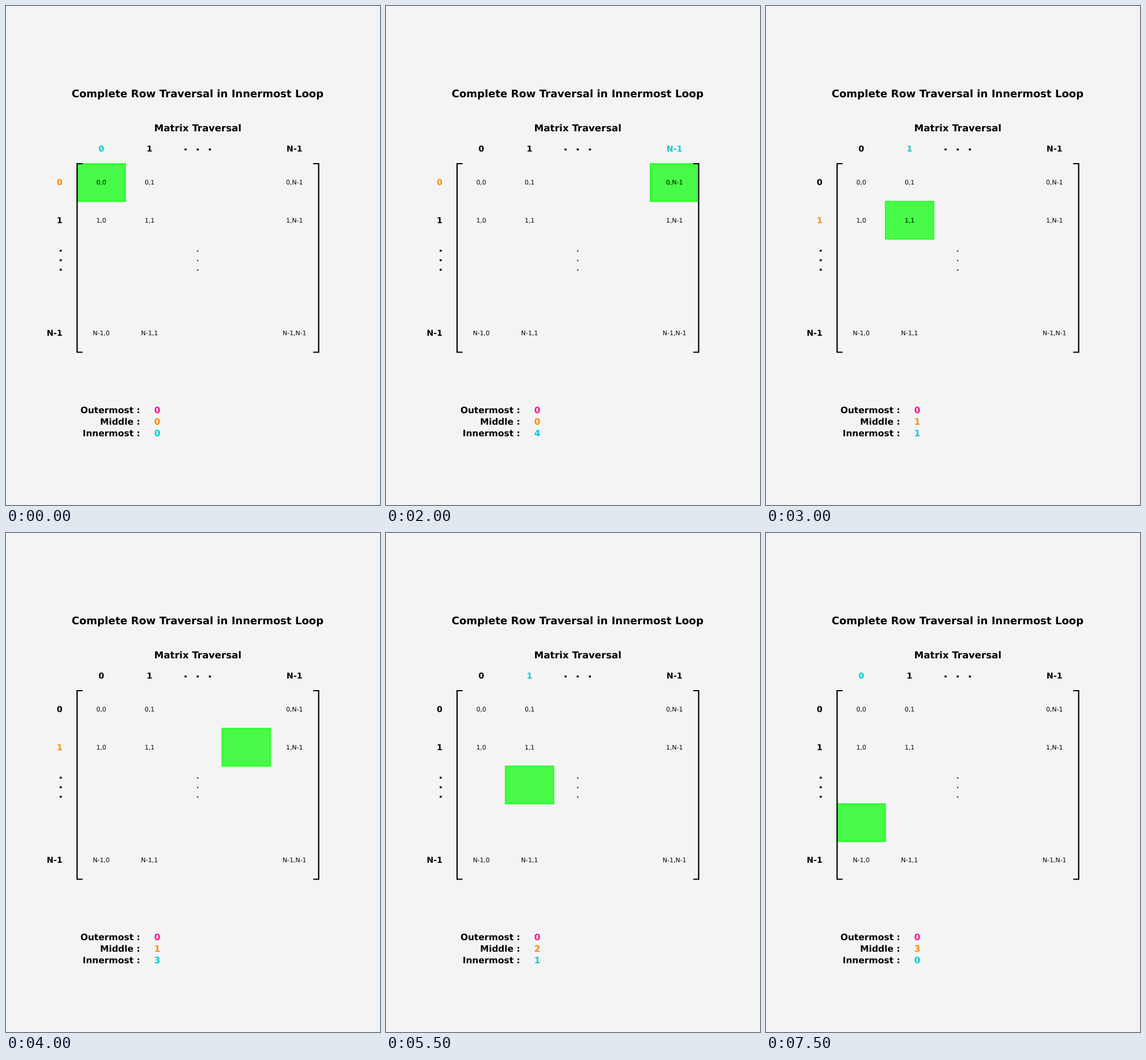
An HTML page for the animation above (8000 ms loop, 648 by 864 pixels).

```html
<!DOCTYPE html>
<html lang="en">
<head>
<meta charset="utf-8">
<title>Matrix Traversal</title>
<style>
  html, body { margin: 0; width: 100%; height: 100%; overflow: hidden; background: #f4f4f4; }
  svg { display: block; width: 648px; height: 864px; }
  text { font-family: "DejaVu Sans", sans-serif; text-rendering: geometricPrecision; }
  .bold { font-weight: bold; }
</style>
</head>
<body>
<svg id="stage" viewBox="0 0 648 864"></svg>
<script>
const STEP = 500, STEPS = 16, SIZE = 5;
const LEFT = 123.2, TOP = 273, CELL_W = 83.7, CELL_H = 65.3;
const CYAN = '#00ced1', ORANGE = '#ff8c00', PINK = '#ff1493';
const stage = document.getElementById('stage');

function add(tag, attrs, text = '') {
  const el = document.createElementNS('http://www.w3.org/2000/svg', tag);
  for (const key in attrs) el.setAttribute(key, attrs[key]);
  el.textContent = text;
  return stage.appendChild(el);
}

const label = (text, x, y, size, anchor = 'middle', fill = '#000', cls = 'bold') =>
  add('text', { x, y, 'font-size': size, 'text-anchor': anchor, fill, class: cls }, text);

const dot = (x, y, w, h = w) => add('rect', { x: x - w / 2, y: y - h / 2, width: w, height: h });

const colX = c => LEFT + (c + 0.5) * CELL_W;
const rowY = r => TOP + (r + 0.5) * CELL_H;

const cell = add('rect', {
  width: CELL_W, height: CELL_H, fill: '#0f0', stroke: '#0f0',
  'fill-opacity': 0.7, 'stroke-opacity': 0.7, 'stroke-width': 2
});

// Brackets
const right = LEFT + SIZE * CELL_W, bottom = TOP + SIZE * CELL_H, tick = CELL_W / 10;
add('path', {
  d: `M${LEFT + tick} ${TOP}H${LEFT}V${bottom}h${tick}M${right - tick} ${TOP}H${right}V${bottom}h${-tick}`,
  fill: 'none', stroke: '#000', 'stroke-width': 2.2, 'stroke-linecap': 'square'
});

label('Complete Row Traversal in Innermost Loop', 331.9, 158, 18.05);
label('Matrix Traversal', 332.3, 217, 16.5);

// Row, column and cell labels; indices 2 and 3 are elided
const names = { 0: '0', 1: '1', 4: 'N-1' };
const cols = {}, rows = {};
for (const i in names) {
  cols[i] = label(names[i], colX(+i), 252, 14.1);
  rows[i] = label(names[i], 97.9, rowY(+i) + 4.6, 14.1, 'end');
  for (const j in names)
    label(names[i] + ',' + names[j], colX(+j), rowY(+i) + 3.6, 10.85, 'middle', '#000', '');
}
for (const k of [-1, 0, 1]) {
  dot(332.2 + k * 21.1, 248.4, 3.6, 3.2);
  dot(94.8, 440.2 + k * 16.5, 3.6, 3.2);
  dot(332.2, 440.7 + k * 16.5, 2);
}

// Loop counters
const counters = [['Outermost', PINK], ['Middle', ORANGE], ['Innermost', CYAN]].map(([name, color], i) => {
  const y = 705.4 + i * 19.8;
  label(name + ' :', 232.4, y, 15.3, 'end');
  return label('0', 262.1, y, 15.3, 'middle', color);
});

const highlight = (labels, active, color) => {
  for (const i in labels) labels[i].setAttribute('fill', +i === active ? color : '#000');
};

function draw() {
  const step = Math.floor(performance.now() / STEP) % STEPS;
  const row = Math.floor(step / SIZE), col = step % SIZE;
  cell.setAttribute('x', LEFT + col * CELL_W);
  cell.setAttribute('y', TOP + row * CELL_H);
  highlight(cols, col, CYAN);
  highlight(rows, row, ORANGE);
  counters[1].textContent = row;
  counters[2].textContent = col;
  requestAnimationFrame(draw);
}
draw();
</script>
</body>
</html>
```
